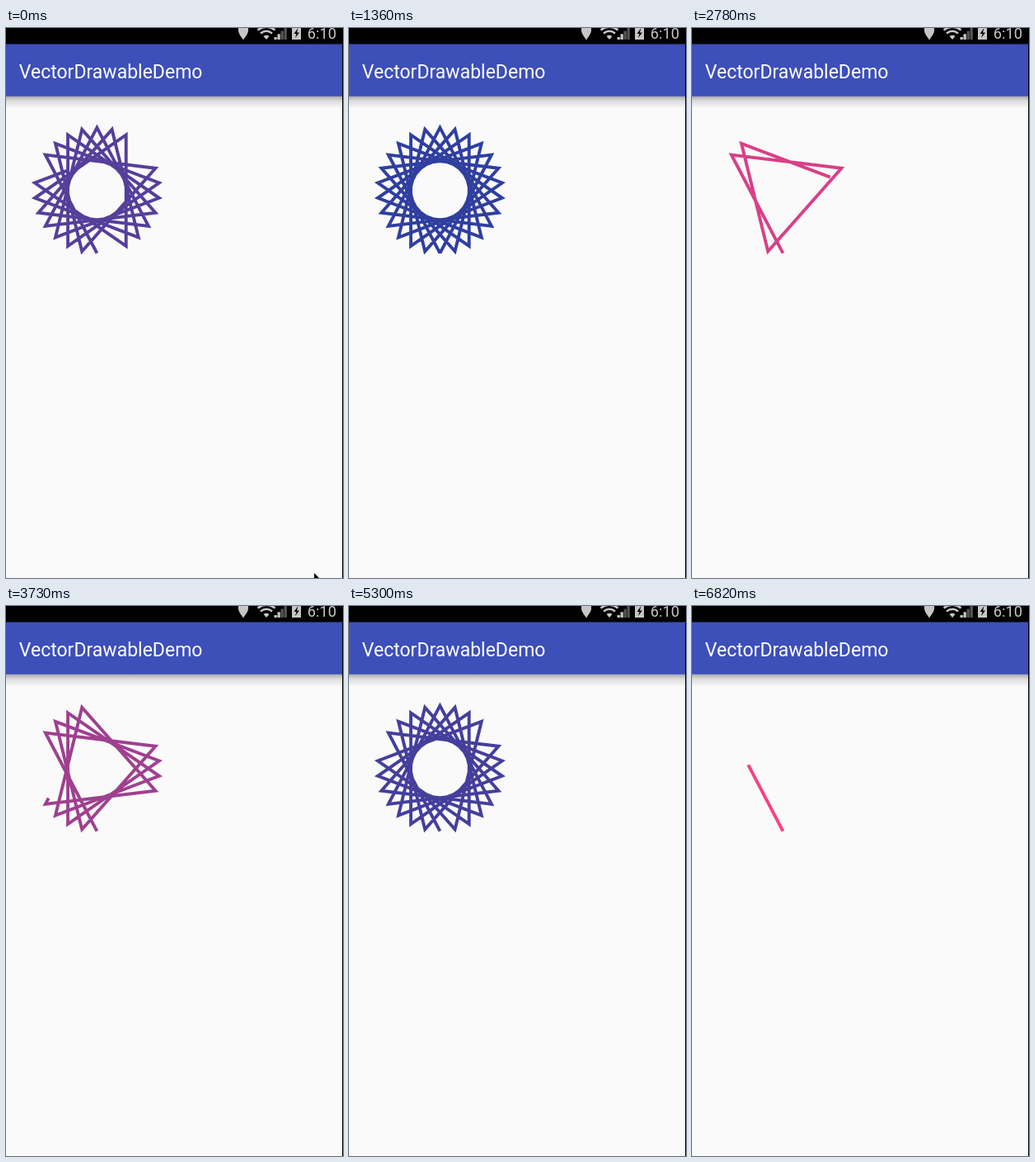
An HTML page that plays this animation: 409 px wide and 666 px high, repeating every 6.92 s.

```html
<!DOCTYPE html>
<html lang="en">
<head>
<meta charset="utf-8">
<title>Star drawing</title>
<style>
  html, body { margin: 0; width: 100%; height: 100%; overflow: hidden; background: #fafafa; }
  svg { display: block; width: 409px; height: 666px; }
  text { font-family: Roboto, "Open Sans", sans-serif; }
</style>
</head>
<body>
<svg viewBox="0 0 409 666">
  <defs>
    <linearGradient id="shade" x1="0" y1="0" x2="0" y2="1">
      <stop offset="0" stop-color="#000" stop-opacity=".32"/>
      <stop offset=".4" stop-color="#000" stop-opacity=".12"/>
      <stop offset="1" stop-color="#000" stop-opacity="0"/>
    </linearGradient>
  </defs>
  <rect width="409" height="666" fill="#fafafa"/>
  <rect y="82.500" width="409" height="15" fill="url(#shade)"/>
  <rect width="409" height="20"/>
  <rect y="19.500" width="409" height="63.300" fill="#3d4fb8"/>
  <rect x="408" y="20" width="1" height="646"/>
  <text x="15.800" y="60.600" font-size="23" fill="#fff">VectorDrawableDemo</text>

  <!-- status icons -->
  <g fill="#c6c6c6">
    <path d="M282 0H294V3C294 7 290 11 288 14.500C286 11 282 7 282 3Z"/>
    <path d="M347 0H358V14H347Z"/>
    <text x="365.800" y="12.800" font-size="18.200">6:10</text>
    <path d="M312.500 10Q316 7.500 319.500 10L316 14Z"/>
  </g>
  <path d="M354.500 0L349.500 7H352.500L351 12L356 5.500H353Z"/>
  <path d="M305.500 2.500Q316 -5 326.500 2.500M309 6.500Q316 1 323 6.500" fill="none" stroke="#c6c6c6" stroke-width="2.600"/>
  <g id="bars"></g>

  <polyline id="star" fill="none" stroke-width="3.9"/>
  <path id="pointer" d="M374 660L380 666H374Z"/>
</svg>
<script>
const LOOP = 6920, HOLD = 100;
const CYCLE = 4935, RESTART = 1377;
const POINTS = 26, SKIP = 9;
const CX = 110.4, CY = 196.7, RADIUS = 76;
const PINK = [255, 64, 129], INDIGO = [48, 63, 159];

const star = document.getElementById("star");
const pointer = document.getElementById("pointer");
const mix = (a, b, f) => a + (b - a) * f;
const ease = p => (1 - Math.cos(Math.PI * p)) / 2;

function vertex(i) {
  const angle = 2 * Math.PI * SKIP * i / POINTS;
  return [CX - RADIUS * Math.sin(angle), CY + RADIUS * Math.cos(angle)];
}

// Trace the first part f of the star and tint it to match.
function drawStar(f) {
  const end = f * POINTS, whole = Math.floor(end);
  const pts = Array.from({ length: whole + 1 }, (_, i) => vertex(i));
  const next = vertex(whole + 1);
  pts.push(pts[whole].map((v, k) => mix(v, next[k], end - whole)));
  star.setAttribute("points", pts.map(p => p.map(v => v.toFixed(2)).join()).join(" "));
  star.setAttribute("stroke", `rgb(${PINK.map((c, k) => Math.round(mix(c, INDIGO[k], f)))})`);
}

function buildBars() {
  const bars = document.getElementById("bars");
  for (let i = 0; i < 4; i++) {
    const bar = document.createElementNS("http://www.w3.org/2000/svg", "rect");
    const h = 3 + i * 3.7;
    const attrs = { x: 325.5 + i * 4, y: 14 - h, width: 3.3, height: h, fill: i < 2 ? "#c6c6c6" : "#555" };
    for (const k in attrs) bar.setAttribute(k, attrs[k]);
    bars.append(bar);
  }
}

const start = performance.now();
function render() {
  const now = (performance.now() - start) % LOOP;
  const t = Math.min(now, LOOP - HOLD);
  drawStar(ease((t - RESTART + CYCLE) % CYCLE / CYCLE));
  pointer.style.display = t < 80 ? "" : "none";
  requestAnimationFrame(render);
}

buildBars();
render();
</script>
</body>
</html>
```
